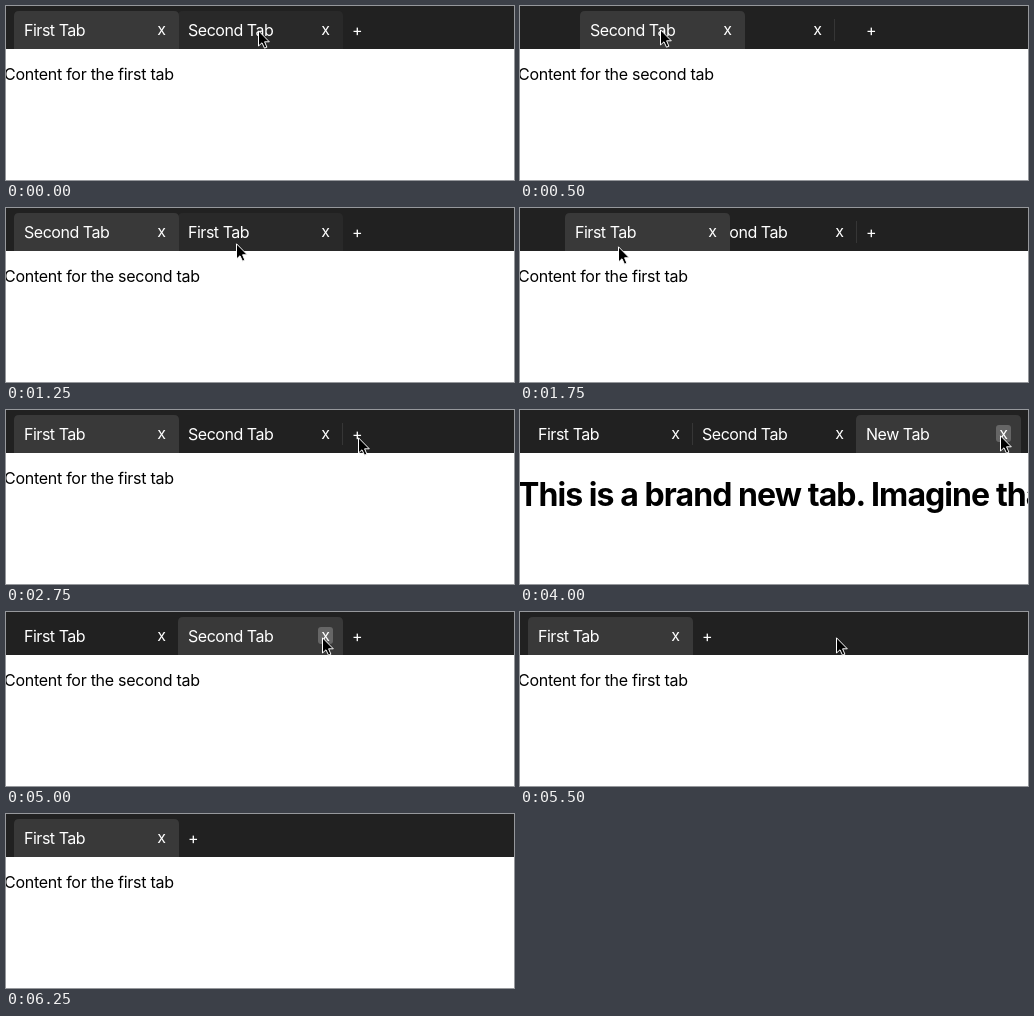
These frames come from a looping animation (508x174 px, 7.25 s). An HTML page:

```html
<!DOCTYPE html>
<html lang="en">
<head>
<meta charset="utf-8">
<title>Draggable tabs</title>
<style>
  html, body { margin: 0; width: 100%; height: 100%; overflow: hidden; background: #fff; }
  svg { display: block; }
  text { font: 16px Inter, "Open Sans", sans-serif; letter-spacing: -0.27px; white-space: pre; }
  .bar text { fill: #fff; letter-spacing: -0.48px; }
  .bar .close { letter-spacing: 0; text-anchor: middle; }
  .title { font-size: 32px; font-weight: 700; letter-spacing: -0.92px; }
</style>
</head>
<body>
<svg id="stage" width="508" height="174" viewBox="0 0 508 174"></svg>
<script>
const STEP = 250, LOOP = 7250;
const BAR = '#212121', ACTIVE = '#393939', HOVER = '#292929', FADING = '#242424';
const PITCH = 164, LEFT = 8;

const tab = (name, slot, color, x = LEFT + slot * PITCH) => ({ name, color, x });
const first = (slot, color, x) => tab('First', slot, color, x);
const second = (slot, color, x) => tab('Second', slot, color, x);
const added = tab('New', 2, ACTIVE);

// Each entry overrides the one before it; one entry per step.
const changes = [
  { cursor: [252, 24], page: 'first', tabs: [first(0, ACTIVE), second(1, HOVER)] },
  { cursor: [249, 23], page: 'second', tabs: [first(0), second(1, ACTIVE, 169)] },
  { cursor: [140, 23], tabs: [second(0, ACTIVE, 60), first(1, null, 150)] },
  { cursor: [126, 23], tabs: [second(0, ACTIVE), first(1)] },
  { cursor: [215, 31], tabs: [second(0, ACTIVE), first(1, FADING)] },
  { cursor: [230, 35], tabs: [second(0, ACTIVE), first(1, HOVER)] },
  { cursor: [227, 36], page: 'first', tabs: [second(0), first(1, ACTIVE, 169)] },
  { cursor: [98, 38], tabs: [first(0, ACTIVE, 45), second(1)] },
  { cursor: [86, 32], tabs: [first(0, ACTIVE), second(1)] },
  { cursor: [220, 22], tabs: [first(0, ACTIVE), second(1, FADING)] },
  { cursor: [290, 22], tabs: [first(0, ACTIVE), second(1, HOVER)] },
  { cursor: [352, 27], tabs: [first(0, ACTIVE), second(1)] },
  { page: 'new', tabs: [first(0), second(1), added] },
  { cursor: [387, 14] },
  { cursor: [493, 14] },
  { cursor: [482, 28], button: '#555' },
  { cursor: [480, 25], button: '#666' },
  { page: 'second', button: null, tabs: [first(0), second(1, ACTIVE)] },
  { cursor: [370, 43] },
  { cursor: [322, 28] },
  { cursor: [316, 25], button: '#666' },
  { page: 'first', button: null, tabs: [first(0, '#2d2d2d')] },
  { tabs: [first(0, ACTIVE)] },
  {},
  { cursor: [427, -13] },
  { cursor: null },
];
const states = [];
changes.forEach((change, i) => states.push({ ...states[i - 1], ...change }));

const rect = (x, y, w, h, fill, rx = 0) =>
  `<rect x="${x}" y="${y}" width="${w}" height="${h}" rx="${rx}" fill="${fill}"/>`;
const label = (x, y, string, style = '') =>
  `<text x="${x}" y="${y}" class="${style}">${string}</text>`;

function drawTab({ name, x, color }, button) {
  const shape = color
    ? `<path d="M${x} 43v-33q0-5 5-5h155q5 0 5 5v33z" fill="${color}"/>` : '';
  const highlight = button && color === ACTIVE ? rect(x + 140, 15, 15, 17, button, 3) : '';
  return shape + highlight + label(x + 10, 30, name + ' Tab') + label(x + 147.5, 29, 'x', 'close');
}

function drawBar({ tabs, button }) {
  const separators = tabs.map((t, i) =>
    t.color || tabs[i + 1]?.color ? '' : rect(t.x + PITCH, 13, 1, 22, '#363636'));
  const activeLast = [...tabs].sort((a, b) => (a.color === ACTIVE) - (b.color === ACTIVE));
  return '<g class="bar">' + rect(0, 0, 508, 43, BAR) + separators.join('')
    + label(18 + tabs.length * PITCH, 30, '+')
    + activeLast.map(t => drawTab(t, button)).join('') + '</g>';
}

const drawPage = page => page === 'new'
  ? label(-2, 96, 'This is a brand new tab. Imagine that.', 'title')
  : label(-2, 74, `Content for the ${page} tab`);

const drawCursor = ([x, y]) =>
  `<path transform="translate(${x} ${y})" d="M.5 .8V16L4 12.8L6.5 18.2L8.9 17.2L6.6 11.8H11.3Z"
    fill="#000" stroke="#fff"/>`;

const stage = document.getElementById('stage');
let shown;
function render() {
  const step = Math.floor(performance.now() % LOOP / STEP);
  const state = states[Math.min(step, states.length - 1)];
  if (state !== shown) {
    shown = state;
    stage.innerHTML = rect(0, 0, 508, 174, '#fff') + drawPage(state.page) + drawBar(state)
      + (state.cursor ? drawCursor(state.cursor) : '');
  }
  requestAnimationFrame(render);
}
render();
</script>
</body>
</html>
```
